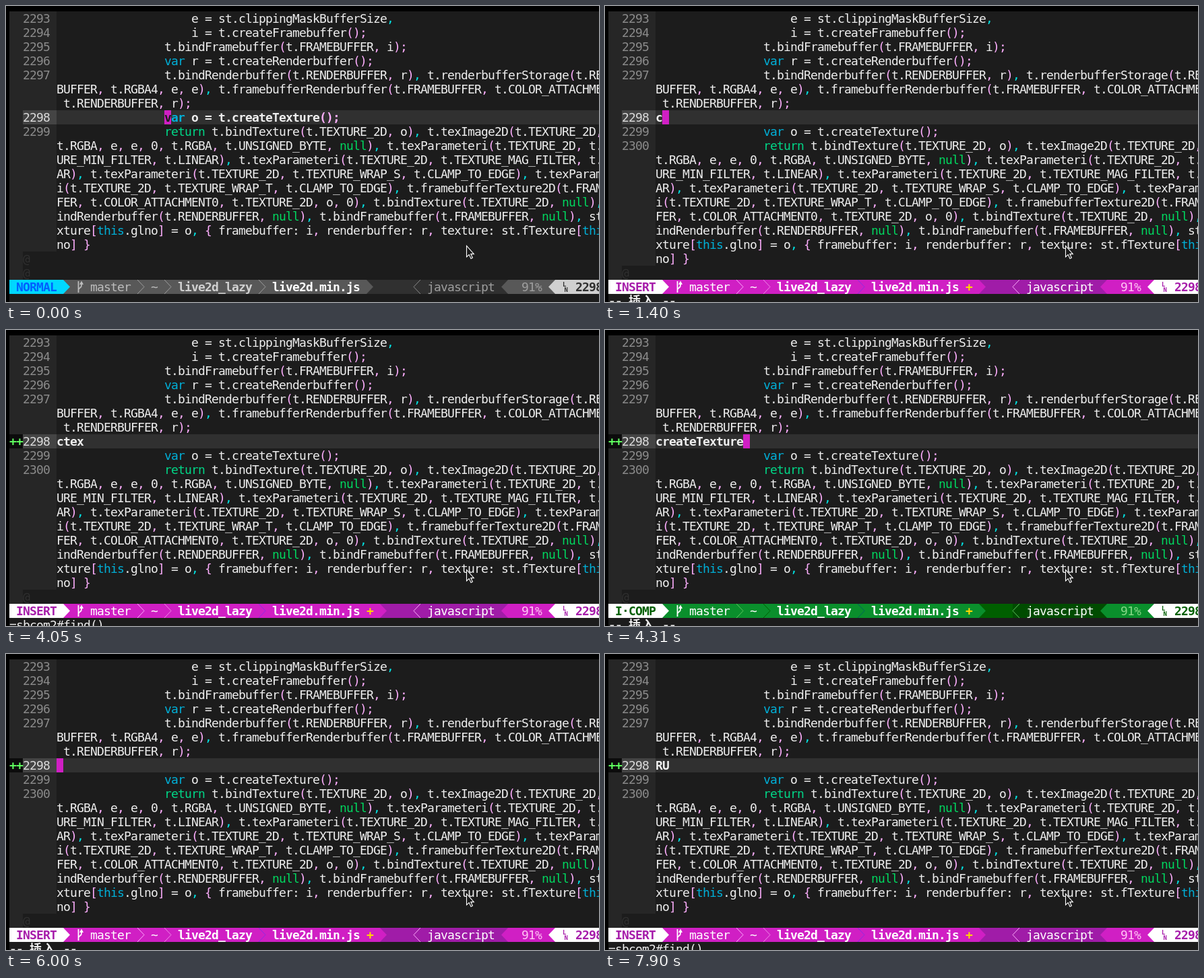
An HTML page with a canvas for the animation above (8 s loop, 880 px wide and 440 px high).

```html
<!DOCTYPE html>
<html lang="zh">
<head>
<meta charset="utf-8">
<style>
html, body { margin: 0; width: 880px; height: 440px; overflow: hidden; background: #000; }
canvas { display: block; }
</style>
</head>
<body>
<canvas id="stage" width="880" height="440"></canvas>
<script>
const ctx = document.getElementById('stage').getContext('2d');
const LOOP = 8000, CW = 10, RH = 21, LEFT = 5, TOP = 8, TEXT_X = 75, WRAP = 85;
const FONT = '18px "DejaVu Sans Mono", "Noto Sans CJK SC", "Noto Sans CJK", monospace';
const BG = '#1c1c1c', GUTTER = '#262626', LINE = '#303030', FG = '#eeeeee', CURSOR = '#d01fc4';
const WORDS = { var: '#00afd7', this: '#00afd7', return: '#00d787', null: '#00d75f' };
const PINK = '#ffafff', CYAN = '#00e5e5';

const indent = n => ' '.repeat(n);
const HEAD = [
  indent(20) + 'e = st.clippingMaskBufferSize,',
  indent(20) + 'i = t.createFramebuffer();',
  indent(16) + 't.bindFramebuffer(t.FRAMEBUFFER, i);',
  indent(16) + 'var r = t.createRenderbuffer();',
  indent(16) + 't.bindRenderbuffer(t.RENDERBUFFER, r), t.renderbufferStorage(t.RENDERBUFFER, t.RGBA4, e, e), ' +
    't.framebufferRenderbuffer(t.FRAMEBUFFER, t.COLOR_ATTACHMENT0, t.RENDERBUFFER, r);'
];
const param = (name, value) => `t.texParameteri(t.TEXTURE_2D, t.TEXTURE_${name}, t.${value}), `;
const TAIL = [
  indent(16) + 'var o = t.createTexture();',
  indent(16) + 'return t.bindTexture(t.TEXTURE_2D, o), t.texImage2D(t.TEXTURE_2D, 0, t.RGBA, e, e, 0, ' +
    't.RGBA, t.UNSIGNED_BYTE, null), ' +
    param('MIN_FILTER', 'LINEAR') + param('MAG_FILTER', 'LINEAR') +
    param('WRAP_S', 'CLAMP_TO_EDGE') + param('WRAP_T', 'CLAMP_TO_EDGE') +
    't.framebufferTexture2D(t.FRAMEBUFFER, t.COLOR_ATTACHMENT0, t.TEXTURE_2D, o, 0), ' +
    't.bindTexture(t.TEXTURE_2D, null), t.bindRenderbuffer(t.RENDERBUFFER, null), ' +
    't.bindFramebuffer(t.FRAMEBUFFER, null), st.fTexture[this.glno] = o, ' +
    '{ framebuffer: i, renderbuffer: r, texture: st.fTexture[this.glno] }'
];

const THEMES = {
  normal: { label: 'NORMAL', modeBg: '#00d7ff', modeFg: '#005fff', bar: '#585858', mid: '#303030', typeBg: '#303030',
    dim: '#bcbcbc', dir: '#d0d0d0', type: '#9e9e9e', pct: '#9e9e9e', seps: ['#9e9e9e', '#9e9e9e', '#9e9e9e'],
    thin: '#8a8a8a', endBg: '#d0d0d0', endFg: '#303030' },
  insert: { label: 'INSERT', modeBg: '#ffffff', modeFg: '#a61caa', bar: CURSOR, mid: '#a01ca8', typeBg: '#a01ca8',
    dim: '#ffffff', dir: '#ffffff', type: '#ffffff', pct: '#ffc4f4', seps: ['#ffafff', '#f08ae8', '#8a2be2'],
    thin: '#ffafff', endBg: '#ffffff', endFg: '#a61caa', plus: true },
  comp: { label: 'I·COMP', modeBg: '#ffffff', modeFg: '#005f00', bar: '#0a8f2c', mid: '#005f00', typeBg: '#004c00',
    dim: '#ffffff', dir: '#ffffff', type: '#ffffff', pct: '#87d787', seps: ['#5fc75f', '#005f00', '#005f5f'],
    thin: '#5fc75f', endBg: '#ffffff', endFg: '#005f00', plus: true }
};

const INS = '-- 插入 --', FIND = '=sbcom2#find()', DONE = 'createTexture';
const typed = text => ({ text });
const erase = n => ({ text: DONE.slice(0, n) });

// Each step overrides part of the previous state.
const STEPS = [
  [0, { layout: 'before', text: '', cursor: true, theme: 'normal', msg: '', sign: false }],
  [920, { cursor: false, msg: INS }],
  [960, { layout: 'partial' }],
  [1000, { layout: 'after', cursor: true, theme: 'insert' }],
  [1400, typed('c')], [1480, { sign: true }],
  [2640, typed('ct')], [2800, typed('cte')], [3240, typed('ctex')],
  [4050, { msg: FIND, cursor: false }],
  [4230, typed(DONE)], [4270, { msg: INS }], [4310, { theme: 'comp', cursor: true }],
  [4720, { msg: '', cursor: false }], [4770, { ...erase(12), msg: INS }],
  [4810, { theme: 'insert', cursor: true }],
  [5220, erase(11)], [5270, erase(9)], [5310, erase(8)], [5350, erase(6)], [5390, erase(5)], [5430, erase(3)],
  [5590, erase(2)], [5820, erase(1)], [6000, erase(0)],
  [6950, typed('R')], [7110, typed('RU')],
  [7860, { cursor: false }], [7900, { msg: FIND }]
];
let last = {};
const STATES = STEPS.map(([at, change]) => (last = { ...last, ...change, at }));

function colorize(text) {
  let depth = 0;
  const cells = [];
  for (const [token] of text.matchAll(/\w+|[^\w]/g)) {
    let color = WORDS[token] || FG;
    if ('([{'.includes(token)) { depth++; color = PINK; }
    else if (')]}'.includes(token)) { depth--; color = PINK; }
    else if (token === ';') color = PINK;
    else if (token === ',') color = depth ? PINK : CYAN;
    for (const ch of token) cells.push([ch, color]);
  }
  return cells;
}

function wrapLine(text, num) {
  const cells = colorize(text), rows = [];
  do rows.push({ num: rows.length ? '' : num, cells: cells.splice(0, WRAP) }); while (cells.length);
  return rows;
}

function buildRows(lines) {
  const rows = lines.flatMap((line, i) => wrapLine(line, String(2293 + i)));
  while (rows.length < 19) rows.push({ filler: true });
  return rows;
}

const before = buildRows([...HEAD, ...TAIL]);
const after = buildRows([...HEAD, '', ...TAIL]);
const seam = { num: '', cells: [...after[13].cells.slice(0, 2), ...before[13].cells.slice(2)] };
const LAYOUTS = { before, after, partial: [...after.slice(0, 13), seam, ...before.slice(14)] };

function rect(x, y, w, h, color) {
  ctx.fillStyle = color;
  ctx.fillRect(x, y, w, h);
}

// Every glyph sits on the terminal grid; wide characters take two cells.
function write(text, x, row, color, bold) {
  ctx.font = (bold ? 'bold ' : '') + FONT;
  ctx.fillStyle = color;
  for (const ch of text) {
    ctx.fillText(ch, x, TOP + row * RH + 17);
    x += ch > '\u2fff' ? 2 * CW : CW;
  }
}

function drawRow(row, i, state) {
  const y = TOP + i * RH, current = i === 7;
  rect(LEFT, y, 20, RH, GUTTER);
  if (row.filler) return write('@', 25, i, '#303030');
  rect(25, y, 50, RH, current ? '#444444' : GUTTER);
  if (current) rect(TEXT_X, y, 880 - TEXT_X, RH, LINE);
  write(row.num, 25, i, current ? '#dadada' : '#8a8a8a');
  const cells = current && state.layout !== 'before' ? colorize(state.text) : row.cells;
  cells.forEach(([ch, color], col) => write(ch, TEXT_X + col * CW, i, color, current));
  if (!current) return;
  if (state.sign) {
    rect(LEFT, y, 20, RH, '#0c0c0c');
    write('++', LEFT, i, '#5fff5f', true);
  }
  if (state.cursor) {
    const col = state.layout === 'before' ? 16 : state.text.length;
    rect(TEXT_X + col * CW, y, CW, RH, CURSOR);
    if (cells[col]) write(cells[col][0], TEXT_X + col * CW, i, BG, true);
  }
}

const SY = TOP + 19 * RH;

// Powerline separators: dir 1 points right, -1 points left.
function chevron(x, dir, color, solid) {
  const a = dir > 0 ? x : x + CW, b = dir > 0 ? x + CW : x;
  ctx.beginPath();
  ctx.moveTo(a, SY);
  ctx.lineTo(b, SY + RH / 2);
  ctx.lineTo(a, SY + RH);
  if (solid) {
    ctx.fillStyle = color;
    ctx.fill();
  } else {
    ctx.strokeStyle = color;
    ctx.lineWidth = 1;
    ctx.stroke();
  }
}

function branchIcon(color) {
  ctx.strokeStyle = ctx.fillStyle = color;
  ctx.lineWidth = 1.8;
  ctx.stroke(new Path2D('M107.5 409V426M107.5 422C108 418 112 420 112 415V413'));
  ctx.fill(new Path2D('M109 414L112 408.5L115 414Z'));
}

function drawStatus(c) {
  const barEnd = c.plus ? 555 : 535;
  rect(LEFT, SY, 875, RH, c.mid);
  rect(85, SY, barEnd - 85, RH, c.bar);
  rect(LEFT, SY, 80, RH, c.modeBg);
  chevron(85, 1, c.modeBg, true);
  chevron(barEnd, 1, c.bar, true);
  write(c.label, 15, 19, c.modeFg, true);
  branchIcon(c.dim);
  write('master', 125, 19, c.dim);
  write('~', 215, 19, c.dim);
  write('live2d_lazy', 255, 19, c.dir, true);
  write('live2d.min.js', 395, 19, '#ffffff', true);
  if (c.plus) write('+', 535, 19, '#ffd700', true);
  [195, 235, 375].forEach((x, i) => chevron(x, 1, c.seps[i]));

  rect(605, SY, 140, RH, c.typeBg);
  chevron(605, -1, c.thin);
  write('javascript', 625, 19, c.type);
  chevron(735, -1, c.bar, true);
  rect(745, SY, 70, RH, c.bar);
  write('91%', 765, 19, c.pct);
  chevron(805, -1, c.endBg, true);
  rect(815, SY, 65, RH, c.endBg);
  write('2298', 845, 19, c.endFg, true);
  ctx.font = 'bold 9px "DejaVu Sans Mono", monospace';
  ctx.fillText('L', 826, SY + 10);
  ctx.fillText('N', 828.5, SY + 18);
}

function drawPointer() {
  const p = new Path2D('M683.5 356.5V373L687.2 369.6L690 375.4L692.4 374.2L689.8 368.6H694.3Z');
  ctx.fillStyle = '#1a1a1a';
  ctx.fill(p);
  ctx.strokeStyle = '#ffffff';
  ctx.lineWidth = 1.1;
  ctx.stroke(p);
}

function draw(state) {
  rect(0, 0, 880, 440, '#000000');
  rect(LEFT, TOP, 875, 432, BG);
  LAYOUTS[state.layout].slice(0, 19).forEach((row, i) => drawRow(row, i, state));
  drawStatus(THEMES[state.theme]);
  write(state.msg, LEFT, 20, FG, state.msg === INS);
  drawPointer();
}

const start = performance.now();
let shown = null;
function tick() {
  const t = (performance.now() - start) % LOOP;
  const state = STATES.findLast(s => s.at <= t);
  if (state !== shown) draw(shown = state);
  requestAnimationFrame(tick);
}
tick();
</script>
</body>
</html>
```
